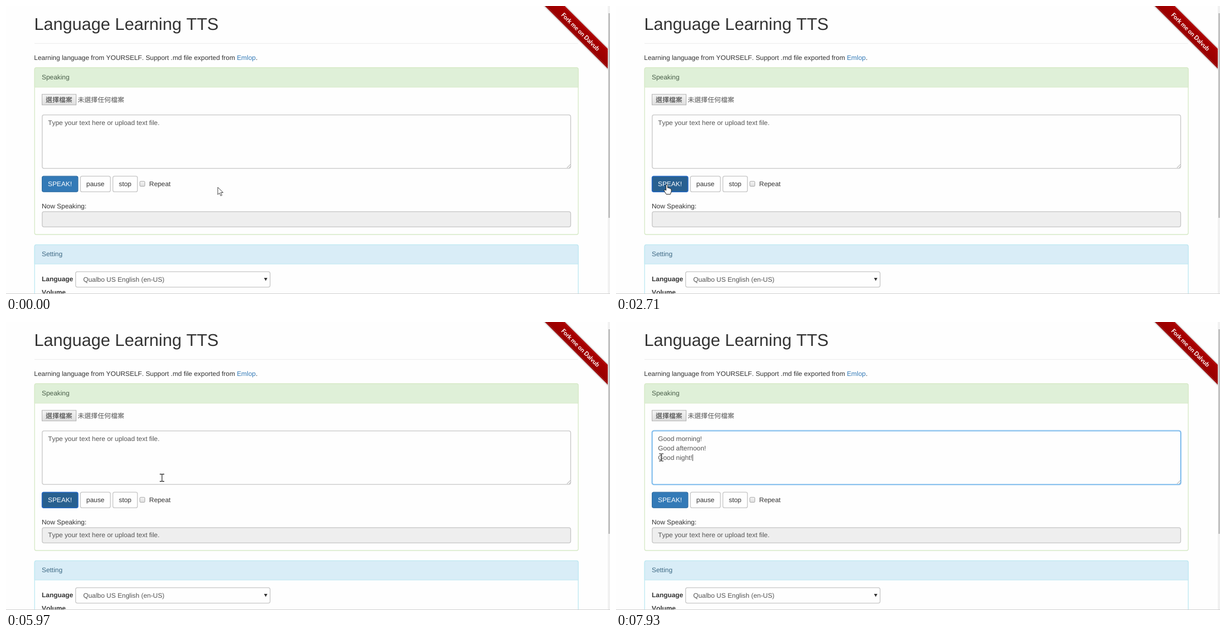
Write an HTML page that moves like this. It is 1081x518 px and loops after 8 s.

```html
<!DOCTYPE html>
<html lang="en">
<head>
<meta charset="utf-8">
<title>Language Learning TTS</title>
<style>
  html, body { margin: 0; width: 100%; height: 100%; overflow: hidden; background: #fefefe; }
  svg { display: block; }
  text {
    font: 11.9px "Liberation Sans", Arial, sans-serif; font-kerning: none;
    fill: #333; text-rendering: geometricPrecision; white-space: pre;
  }
  .cjk { font-family: "Noto Sans CJK TC", "Noto Sans CJK", sans-serif; font-weight: 300; }
  .bold { font-weight: bold; }
  .soft { fill: #555; }
  .field { fill: #fefefe; stroke: #c6c6c6; stroke-width: 1.3; }
</style>
</head>
<body>
<svg width="1081" height="518" viewBox="0 0 1081 518">
  <defs>
    <linearGradient id="grey" x2="0" y2="1"><stop stop-color="#f4f4f4"/><stop offset="1" stop-color="#dedede"/></linearGradient>
    <linearGradient id="red" x2="0" y2="1"><stop stop-color="#a00"/><stop offset="1" stop-color="#960000"/></linearGradient>
    <filter id="shadow" x="-20%" y="-50%" width="140%" height="200%"><feDropShadow dx="0" dy="0" stdDeviation="1.8" flood-opacity=".6"/></filter>
    <clipPath id="view"><path d="M0 0H1077V518H0Z"/></clipPath>
    <clipPath id="selClip"><rect id="selArea" y="203" height="14"/></clipPath>
  </defs>

  <text x="50.5" y="43" style="font-size:30.6px">Language Learning TTS</text>
  <path d="M51 67.3H1024" stroke="#eaeaea"/>
  <text x="50.3" y="97.3">Learning language from YOURSELF. Support .md file exported from <tspan fill="#337ab7">Emlop</tspan>.</text>

  <!-- Speaking panel -->
  <rect x="51.2" y="111" width="973" height="300" rx="3" fill="#fefefe" stroke="#d6e9c6" stroke-width="1.3"/>
  <path d="M51.2 146V114q0-3 3-3H1021.2q3 0 3 3V146Z" fill="#dff0d8" stroke="#d6e9c6"/>
  <text x="64" y="132" style="fill:#4a5f4a">Speaking</text>
  <rect x="64.5" y="158.9" width="61" height="19" fill="url(#grey)" stroke="#b0b0b0"/>
  <text class="cjk" x="71" y="173.2">選擇檔案</text>
  <text class="cjk soft" x="128.3" y="173.2">未選擇任何檔案</text>

  <rect id="glow" x="64.8" y="195.8" width="945.8" height="96.3" rx="3.4" fill="none" stroke="#66afe9" stroke-width="4"/>
  <rect id="area" class="field" x="64.8" y="195.8" width="945.8" height="96.3" rx="3.4"/>
  <path d="M1004 291l6-6M1007.5 291l2.5-2.5" stroke="#999" stroke-width=".9"/>
  <text id="prompt" class="soft" x="75.2" y="214">Type your text here or upload text file.</text>
  <g id="selection">
    <rect id="selBox" y="203.5" height="13" fill="#3390ff"/>
    <text x="75.2" y="214" clip-path="url(#selClip)" style="fill:#fff">Type your text here or upload text file.</text>
  </g>
  <text id="typed" class="soft" y="214"><tspan x="75.2">Good morning!</tspan><tspan x="75.2" dy="17">Good afternoon!</tspan><tspan x="75.2" dy="17">Good night!</tspan></text>
  <path id="caret" stroke="#333" stroke-width=".9"/>

  <rect id="speak" x="64.6" y="306.2" width="64.2" height="28" rx="3"/>
  <text x="75" y="324" style="fill:#fff">SPEAK!</text>
  <rect class="field" x="133.2" y="306.2" width="53.6" height="28" rx="3"/>
  <text x="143.8" y="324">pause</text>
  <rect class="field" x="191.3" y="306.2" width="44" height="28" rx="3"/>
  <text x="202" y="324">stop</text>
  <rect x="239.5" y="315.3" width="9" height="9" rx="1.5" fill="url(#grey)" stroke="#aaa"/>
  <text x="256.3" y="324">Repeat</text>

  <text x="64" y="364.2">Now Speaking:</text>
  <rect class="field" x="64.8" y="369.8" width="945.8" height="27.6" rx="3.4" style="fill:#eee"/>
  <text id="spoken" class="soft" x="75.2" y="387.2">Type your text here or upload text file.</text>

  <!-- Setting panel -->
  <rect x="51.2" y="429.5" width="973" height="120" rx="3" fill="#fefefe" stroke="#bce8f1" stroke-width="1.3"/>
  <path d="M51.2 464V432.5q0-3 3-3H1021.2q3 0 3 3V464Z" fill="#d9edf7" stroke="#bce8f1"/>
  <text x="64" y="450.4" style="fill:#3f6a85">Setting</text>
  <text class="bold" x="64" y="495">Language</text>
  <rect class="field" x="124.6" y="477.8" width="348" height="27.8" rx="3.4"/>
  <text class="soft" x="138.2" y="496">Qualbo US English (en-US)</text>
  <path d="M461.8 489h6l-3 5.4Z" fill="#333"/>
  <text class="bold" x="64" y="518.6">Volume</text>
  <path d="M0 517.5H1081" stroke="#d0d0d0"/>

  <!-- Corner ribbon -->
  <g clip-path="url(#view)">
    <g transform="translate(1028 46.5) rotate(45)">
      <rect x="-100" y="-13" width="200" height="25" fill="url(#red)" filter="url(#shadow)"/>
      <path d="M-100 -11.3H100M-100 10.3H100" stroke="#c66" stroke-width=".6" stroke-dasharray="1.5 1"/>
      <text y="3.7" text-anchor="middle" style="font:bold 10.9px Lato,sans-serif;fill:#fff">Fork me on Dalvub</text>
    </g>
  </g>
  <path d="M1077 0h4V517h-4Z" fill="#f1f1f1"/>
  <path d="M1078 13h3V381h-3Z" fill="#c1c1c1"/>

  <g id="mouse">
    <circle id="press" r="10" fill="#f9f03a" opacity=".88"/>
    <path id="arrow" d="M0 0V13.2L3.1 10.4 5.3 15.4 7.5 14.4 5.3 9.5H9.6Z" fill="#fff" stroke="#333" stroke-width=".9"/>
    <path id="hand" d="M-1.4 10.5V1.5Q-1.4 0 0 0T1.4 1.5V6Q3.8 5 4.2 6.8 6.2 6 6.5 7.7 8 7.2 8 9V12.5L6.3 17.5H-1L-4.8 11.2Q-5 9 -3.2 9.3Z" fill="#fff" stroke="#222"/>
    <path id="beam" d="M-4 -6.5H-1.2L0 -5.8 1.2 -6.5H4M0 -6V6M-4 6.5H-1.2L0 5.8 1.2 6.5H4" fill="none" stroke="#111" stroke-width="1.1"/>
  </g>
</svg>
<script>
const LOOP = 8000, STEP = 77.7;
const $ = id => document.getElementById(id);
const set = (id, attrs) => { for (const k in attrs) $(id).setAttribute(k, attrs[k]); };
const show = (id, on) => $(id).style.display = on ? '' : 'none';
const clamp = k => Math.max(0, Math.min(1, k));
const ease = k => 1 - (1 - clamp(k)) ** 1.6;

// Mouse gestures: start, end, goal x, goal y
const gestures = [
  [380, 1230, 136, 338],    // towards the button
  [1230, 1600, 91, 318],    // onto it
  [2550, 2780, 91, 322],
  [2890, 3540, 65, 401],    // down to the spoken line
  [3650, 4580, 161, 399],   // along it
  [4580, 5080, 253, 398],
  [5510, 6490, 295, 209],   // up to the end of the prompt
  [6680, 7200, 69.5, 220],  // drag back over it
  [7680, 7900, 81, 243.5]
];

function mouseAt(t) {
  let x = 379, y = 326;
  for (const [from, to, goalX, goalY] of gestures) {
    const k = ease((t - from) / (to - from));
    x += (goalX - x) * k;
    y += (goalY - y) * k;
  }
  return [x, y];
}

// Selects from the character nearest to x up to the end; returns the width
function selectFrom(x) {
  const text = $('prompt'), last = text.getNumberOfChars() - 1;
  const end = text.getEndPositionOfChar(last).x;
  let start = end;
  for (let i = last; i >= 0; i--) {
    const a = text.getStartPositionOfChar(i).x;
    if (x > (a + start) / 2) break;
    start = a;
  }
  for (const id of ['selBox', 'selArea']) set(id, { x: start, width: end - start });
  return end - start;
}

function draw(now) {
  // The screen refreshes in fixed steps
  const t = Math.floor((now % LOOP + 25) / STEP) * STEP - 25;
  const [x, y] = mouseAt(t);

  const onButton = x > 64 && x < 129 && y > 306 && y < 334;
  const onText = y > 196 && y < 292 || y > 369 && y < 398.5;
  set('mouse', { transform: `translate(${x} ${y})` });
  show('hand', onButton);
  show('beam', onText);
  show('arrow', !onButton && !onText);
  show('press', t > 2300 && t < 2450 || t > 6500 && t < 7430);

  const buttonFocus = t > 2300 && t < 6500;
  set('speak', {
    fill: onButton || buttonFocus ? '#286090' : '#337ab7',
    stroke: buttonFocus ? '#2468c4' : onButton ? '#204d74' : '#2e6da4',
    'stroke-width': buttonFocus ? 1.6 : 1.2
  });
  show('spoken', t > 2920);

  const focus = clamp((t - 6500) / 170);
  const mix = (a, b) => a + (b - a) * focus;
  $('area').style.stroke = `rgb(${mix(198, 92)},${mix(198, 170)},${mix(198, 232)})`;
  set('glow', { opacity: focus * .3 });

  const pasted = t > 7820;
  show('prompt', !pasted);
  show('typed', pasted);
  const selected = focus > 0 && !pasted && selectFrom(t < 7430 ? x : 0) > 0;
  show('selection', selected);
  show('caret', focus > 0 && !selected);
  set('caret', { d: pasted ? 'M137.3 238V250' : 'M275.3 204V216' });
}

const begin = performance.now();
(function loop() {
  draw(performance.now() - begin);
  requestAnimationFrame(loop);
})();
</script>
</body>
</html>
```
